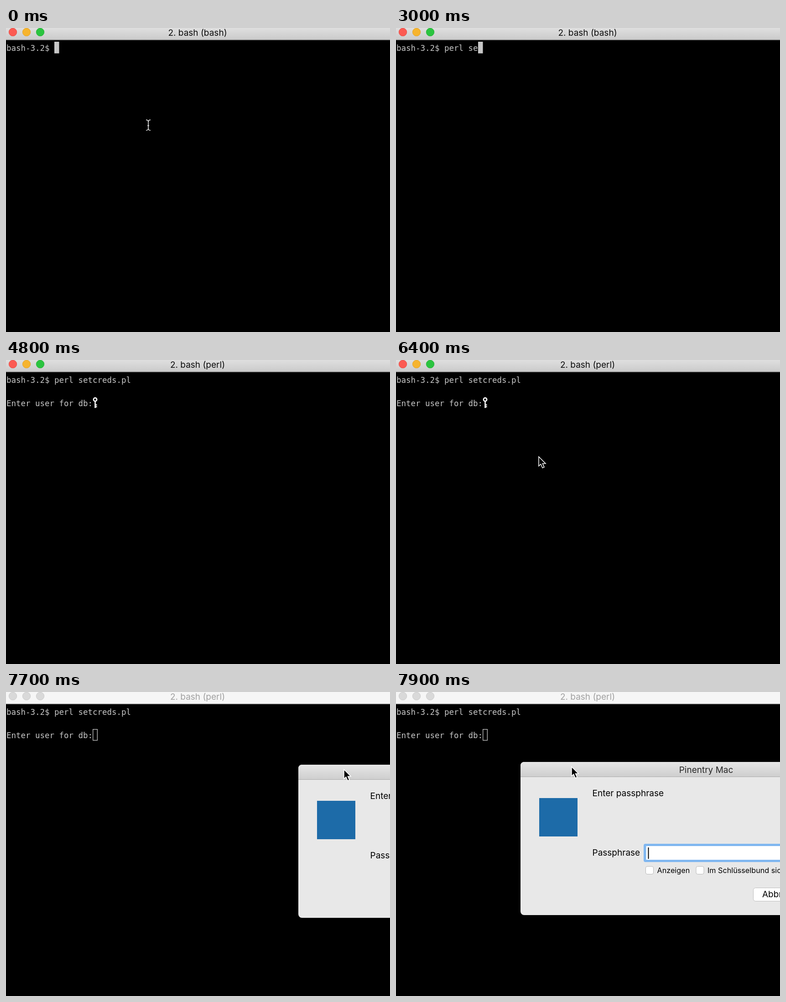
Recreate the animation shown at these times as an HTML page with a canvas. Size 842x665 px, loop 8 s.

```html
<!DOCTYPE html>
<html lang="en">
<head>
<meta charset="utf-8">
<title>Terminal</title>
<style>
  html, body { margin: 0; width: 100%; height: 100%; overflow: hidden; background: #000; }
  canvas { display: block; }
</style>
</head>
<body>
<canvas id="stage" width="842" height="665"></canvas>
<script>
const ctx = document.getElementById('stage').getContext('2d');
const LOOP = 8000, STEP = 100;
const W = 842, H = 665;
const CELL = 10.5, LINE = 25.5, LEFT = 1;
const MONO = '17.44px "DejaVu Sans Mono", "Noto Sans Mono", monospace';
const DIMMED = '#a0a0a0';
const ui = size => `${size}px Inter, Roboto, sans-serif`;

// Command text after the prompt, by the time it appears
const typed = [
  [0, ''], [100, 'p'], [200, 'pe'], [400, 'per'], [500, 'perl'], [800, 'perl '],
  [2800, 'perl s'], [2900, 'perl se'], [3200, 'perl setcreds.pl ']
];
const RUN = 3800, ARROW = 6400, DIALOG = 6500, FOCUS = 6700;

// Time, x, y
const mousePath = [[0, 312, 210], [7200, 312, 210], [7600, 740, 168], [7700, 740, 168], [7900, 384, 162]];
const dialogPath = [[0, 641, 159], [7700, 641, 159], [7900, 273, 153]];

function along(path, t) {
  const next = path.findIndex(p => p[0] > t);
  if (next < 0) return path[path.length - 1].slice(1);
  const [t0, x0, y0] = path[next - 1], [t1, x1, y1] = path[next];
  const k = (t - t0) / (t1 - t0);
  return [Math.round(x0 + (x1 - x0) * k), Math.round(y0 + (y1 - y0) * k)];
}

function text(str, x, y, font, color, align = 'left') {
  ctx.font = font;
  ctx.fillStyle = color;
  ctx.textAlign = align;
  ctx.fillText(str, x, y);
}

function rect(x, y, w, h, color) {
  ctx.fillStyle = color;
  ctx.fillRect(x, y, w, h);
}

function roundBox(x, y, w, h, r, fill, stroke) {
  ctx.beginPath();
  ctx.roundRect(x, y, w, h, r);
  ctx.fillStyle = fill;
  ctx.fill();
  if (stroke) {
    ctx.strokeStyle = stroke;
    ctx.lineWidth = 1;
    ctx.stroke();
  }
}

function fade(y0, y1, top, bottom) {
  const g = ctx.createLinearGradient(0, y0, 0, y1);
  g.addColorStop(0, top);
  g.addColorStop(1, bottom);
  return g;
}

function titleBar(name, active) {
  rect(0, 0, W, 26, active ? fade(0, 25, '#dfdfdf', '#cbcbcb') : '#f6f6f6');
  rect(0, 25, W, 1.5, active ? '#a9a9a9' : '#cfcfcf');
  const lights = active
    ? [['#fb5a52', '#e14640'], ['#f6b42e', '#dda024'], ['#2bc440', '#1fab2d']]
    : Array(3).fill(['#d9d9d9', '#c6c6c6']);
  lights.forEach(([fill, edge], i) => {
    ctx.beginPath();
    ctx.arc(15 + 30 * i, 9, 8.7, 0, 7);
    ctx.fillStyle = fill;
    ctx.fill();
    ctx.strokeStyle = edge;
    ctx.lineWidth = 0.8;
    ctx.stroke();
  });
  text(`2. bash (${name})`, 420, 16.5, ui(19), active ? '#0c0c0c' : DIMMED, 'center');
}

function print(str, row) {
  text(str, LEFT, 49.5 + LINE * row, MONO, '#c7c7c7');
}

function keyCursor(x, y) {
  ctx.strokeStyle = '#fff';
  ctx.lineWidth = 2.6;
  ctx.beginPath();
  ctx.arc(x, y + 5.5, 3.6, 0, 7);
  ctx.moveTo(x, y + 9);
  ctx.lineTo(x, y + 24);
  ctx.stroke();
  rect(x, y + 16, 4, 2.5, '#fff');
  rect(x, y + 20, 4, 2.5, '#fff');
}

function terminal(t) {
  const command = typed.filter(([at]) => at <= t).pop()[1];
  print('bash-3.2$ ' + command, 0);
  if (t < RUN) {
    rect(Math.round(LEFT + CELL * (10 + command.length)), 30, 10.5, 25.5, '#c7c7c7');
    return;
  }
  print('Enter user for db:', 2);
  if (t < DIALOG) {
    keyCursor(195.5, 81);
  } else {
    ctx.strokeStyle = '#c7c7c7';
    ctx.lineWidth = 1.3;
    ctx.strokeRect(190.7, 81.7, 9.6, 24);
  }
}

function checkbox(x, label) {
  roundBox(x + 0.5, 228.5, 17, 17, 3.5, '#fff', '#b9b9b9');
  text(label, x + 25.5, 242.5, ui(16.2), '#000');
}

function dialog(t) {
  const width = 814, height = 335, active = t >= FOCUS;
  ctx.save();
  ctx.translate(...along(dialogPath, t));
  ctx.beginPath();
  ctx.roundRect(0, 0, width, height, 8);
  ctx.clip();
  rect(0, 0, width, height, '#e8e8e8');
  rect(0, 0, width, 32, active ? fade(0, 32, '#e6e6e6', '#cecece') : '#f6f6f6');
  rect(0, 32, width, 1, active ? '#adadad' : '#d0d0d0');
  text('Pinentry Mac', width / 2, 24, ui(19), active ? '#262626' : DIMMED, 'center');

  rect(41, 79, 84, 84, '#1d6ba8');
  text('Enter passphrase', 157.5, 75, ui(19), '#000');
  text('Passphrase', 157.5, 205, ui(19), '#000');

  roundBox(270, 179, 500, 40, 4, '#80b7f0');
  rect(275.5, 184, 489, 30, '#fff');
  rect(279.5, 187, 2, 25, '#000');

  checkbox(274, 'Anzeigen');
  checkbox(384.5, 'Im Schlüsselbund sichern');
  roundBox(510.5, 275.5, 130, 29, 5, '#fff', '#bdbdbd');
  text('Abbrechen', 530, 296, ui(19), '#000');
  ctx.restore();
}

function iBeam(x, y) {
  ctx.strokeStyle = '#f2f2f2';
  ctx.lineWidth = 1.5;
  ctx.beginPath();
  for (const side of [-1, 1]) {
    ctx.moveTo(x + 5 * side, y + 1);
    ctx.quadraticCurveTo(x + side * 0.5, y + 1, x, y + 5);
    ctx.lineTo(x, y + 20);
    ctx.quadraticCurveTo(x + side * 0.5, y + 24, x + 5 * side, y + 24);
  }
  ctx.moveTo(x - 2, y + 13.5);
  ctx.lineTo(x + 2, y + 13.5);
  ctx.stroke();
}

function arrow(x, y) {
  const shape = [[1, 1.5], [1, 22], [5.5, 17.8], [9.2, 26], [13, 24.4], [9.4, 16.4], [16, 16.4]];
  ctx.beginPath();
  shape.forEach(([px, py]) => ctx.lineTo(x + px, y + py));
  ctx.closePath();
  ctx.fillStyle = '#000';
  ctx.fill();
  ctx.strokeStyle = '#fff';
  ctx.lineWidth = 1.5;
  ctx.stroke();
}

function draw(t) {
  rect(0, 0, W, H, '#000');
  titleBar(t < RUN ? 'bash' : 'perl', t < DIALOG);
  terminal(t);
  if (t >= DIALOG) dialog(t);
  if (t < 100) iBeam(312, 200);
  if (t >= ARROW) arrow(...along(mousePath, t));
}

const start = performance.now();
function tick() {
  const t = (performance.now() - start) % LOOP;
  draw(Math.floor(t / STEP) * STEP);
  requestAnimationFrame(tick);
}
tick();
</script>
</body>
</html>
```
